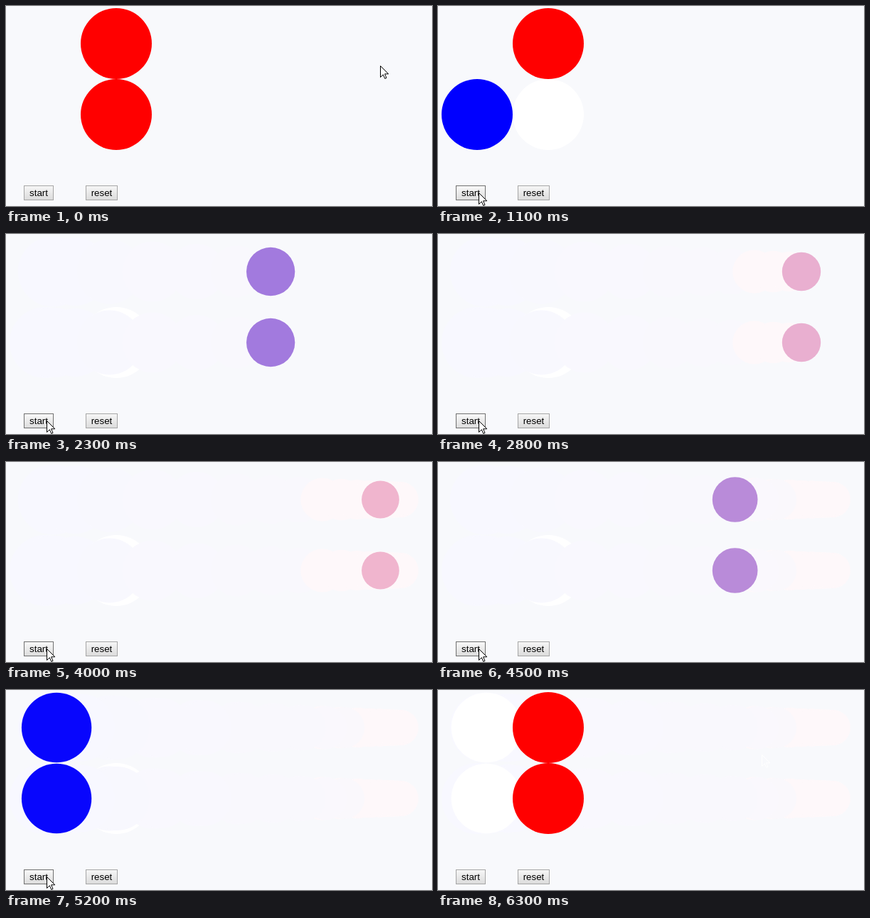
Animation, 599 px wide and 282 px high, one loop 6900 ms. Source, as an HTML page with a canvas:

```html
<!DOCTYPE html>
<html lang="en">
<head>
<meta charset="utf-8">
<title>Bouncing discs</title>
<style>
html, body { margin: 0; width: 100%; height: 100%; overflow: hidden; background: #f8f9fc; }
canvas, .button, #cursor { position: absolute; }
canvas { left: 0; top: 0; }
.button {
  box-sizing: border-box; top: 253px; height: 21px;
  border: 1px solid #a6a6a6;
  background: linear-gradient(#f6f6f6, #dcdcdc);
  font: 13.333px/19px "Liberation Sans", Arial, sans-serif;
  color: #000; text-align: center; white-space: nowrap;
}
#start { left: 25px; width: 42px; }
#reset { left: 112px; width: 45px; }
#start.hover { border-color: #707070; background: linear-gradient(#f8f8f8, #ddd); }
#cursor { left: 0; top: 0; fill: #fff; stroke: #000; }
#cursor.ghost { fill: #f8f9fc; stroke: #fff; }
</style>
</head>
<body>
<canvas id="stage" width="599" height="282"></canvas>
<div class="button" id="start">start</div>
<div class="button" id="reset">reset</div>
<svg id="cursor" width="13" height="20"><path d="M.5.5V16.5L4.3 12.8 6.8 18.4 9 17.4 6.6 11.8H11.8Z"/></svg>
<script>
const LOOP = 6900, STEP = 100;
const CLICK = 700, OUT = 1631, OUT_TIME = 1818, BACK = 3460, BACK_TIME = 1830, END = 5290;
const ROWS = [53, 153];
const ctx = document.getElementById('stage').getContext('2d');
const cursor = document.getElementById('cursor');
const start = document.getElementById('start');

const clamp = v => Math.min(1, Math.max(0, v));
const mix = (a, b, u) => a + (b - a) * u;
const blend = (a, b, u) => `rgb(${a.map((v, i) => Math.round(mix(v, b[i], u)))})`;
const smooth = u => u * u * (3 - 2 * u);

// CSS "ease": cubic-bezier(.25, .1, .25, 1)
function ease(x) {
  const curve = (s, a, b) => 3 * (1 - s) ** 2 * s * a + 3 * (1 - s) * s * s * b + s ** 3;
  let low = 0, high = 1;
  for (let i = 0; i < 24; i++) {
    const s = (low + high) / 2;
    if (curve(s, .25, .25) < x) low = s; else high = s;
  }
  return curve(low, .1, 1);
}

function progress(t) {
  return t < BACK ? ease(clamp((t - OUT) / OUT_TIME)) : ease(clamp((END - t) / BACK_TIME));
}

function disc(x, y, r, color) {
  ctx.fillStyle = color;
  ctx.beginPath();
  ctx.arc(x, y, r, 0, 2 * Math.PI);
  ctx.fill();
}

const mover = (p, y, color) => disc(55 + 500 * p, y, 50 - 25 * p, color);
const red = y => disc(155, y, 50, '#f00');

// Each past pose leaves a faint tint behind
function trailColor(p, t) {
  return p > (t < BACK ? .75 : .86) ? '#fef8fa' : blend([248, 248, 255], [250, 248, 252], p);
}

function drawRow(y, t, begin) {
  if (t < begin) return red(y);
  if (begin === CLICK) disc(155, y, 50, '#fff');
  const first = begin === CLICK ? 1600 : 1700;
  for (let past = first; past < Math.min(t, 5300); past += STEP) {
    const p = progress(past);
    mover(p, y, trailColor(p, past));
  }
  if (t > END) {
    mover(.026, y, '#fff');
    red(y);
  } else {
    const p = progress(t);
    mover(p, y, blend([0, 0, 255], [255, 192, 203], p));
  }
}

function cursorAt(t) {
  if (t < 800) {
    const u = smooth(clamp(t / 650));
    return [mix(526, 61, u), mix(84, 266, u)];
  }
  if (t < 1100) return [60, 265];
  const u = smooth(clamp((t - 5500) / 700));
  return [mix(57, 455, u), mix(263, 91, u)];
}

function frame() {
  const t = Math.floor(performance.now() % LOOP / STEP) * STEP;
  ctx.clearRect(0, 0, 599, 282);
  drawRow(ROWS[0], t, 1700);
  drawRow(ROWS[1], t, CLICK);
  const [x, y] = cursorAt(t).map(Math.round);
  cursor.style.transform = `translate(${x}px, ${y}px)`;
  cursor.classList.toggle('ghost', t >= 6300);
  start.classList.toggle('hover', t >= 600 && t < 5700);
  requestAnimationFrame(frame);
}
frame();
</script>
</body>
</html>
```
